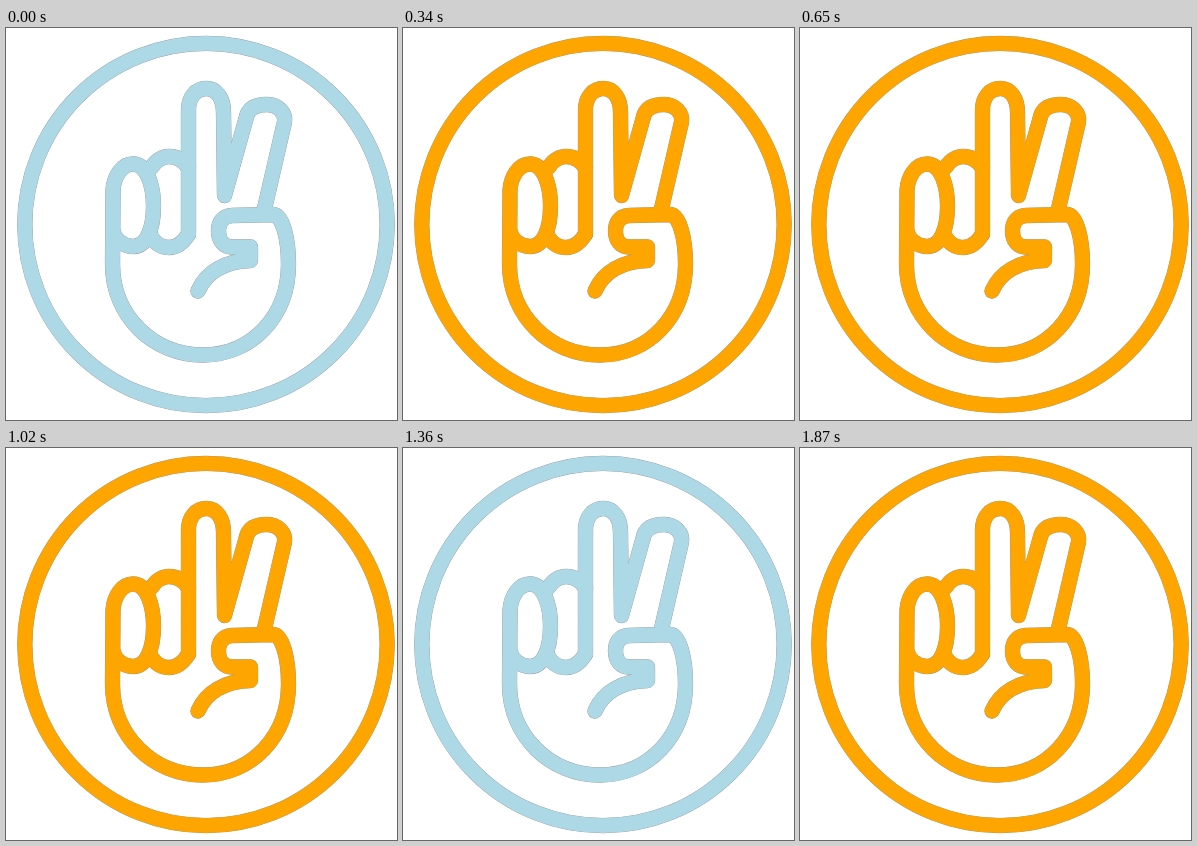
Recreate the animation shown at these times as an HTML page. Size 391 by 392 pixels, loop 2.04 s.

```html
<!DOCTYPE html>
<html lang="en">
<head>
<meta charset="utf-8">
<title>Victory hand</title>
<style>
  html, body { margin: 0; width: 100%; height: 100%; overflow: hidden; background: #fff; }
  svg { display: block; width: 100vw; height: 100vh; }
  .lines { fill: none; stroke-linecap: round; stroke-linejoin: round; }
</style>
</head>
<body>
<svg viewBox="0 0 391 392">
  <defs>
    <g id="sign">
      <circle cx="200" cy="196.5" r="181.2"/>
      <!-- index and middle fingers -->
      <path d="M182.5 206V82C182.5 69 190 60.5 200.5 60.5C211 60.5 217.5 71 217.5 84L218.5 167.5L241 87C244 79 252 76.5 261 76.5C272 76.5 280 85 278.5 94L257.5 185"/>
      <!-- little finger and palm -->
      <path d="M107 202C108 211 117 218.5 127 218.5C141 218.5 147.5 200 147.5 178C147.5 158 141 136 127 136C116 136 108 148 107 162L106.5 236C106.5 288 147 327 197 327C246 327 282.5 288 282.5 236C282.5 212 277 187 267 186.5L226 187.5C216 188 212.5 195 212.5 203C212.5 213 218 219 226 219H244.5V232.5C219 233 200 244 192 263"/>
      <!-- ring finger -->
      <path d="M146 139C150 132 157 128.5 163 128.5C171 128.5 178 133 182.5 140M182.5 206C177 215 171 219.5 163 219.5C155 219.5 149 215 145.5 209"/>
    </g>
  </defs>
  <use class="lines" href="#sign" stroke="#222" stroke-opacity=".5" stroke-width="15.3"/>
  <use class="lines" id="ink" href="#sign" stroke-width="14.8"/>
</svg>
<script>
  const LOOP = 2040;
  const SWITCHES = [340, 850, 1020, 1360, 1870];
  const COLORS = ['#add8e6', '#ffa500'];
  const ink = document.getElementById('ink');

  function draw(ms) {
    const t = ms % LOOP;
    const passed = SWITCHES.filter(s => t >= s).length;
    ink.setAttribute('stroke', COLORS[passed % 2]);
  }

  const start = performance.now();
  function tick() {
    draw(performance.now() - start);
    requestAnimationFrame(tick);
  }
  tick();
</script>
</body>
</html>
```
